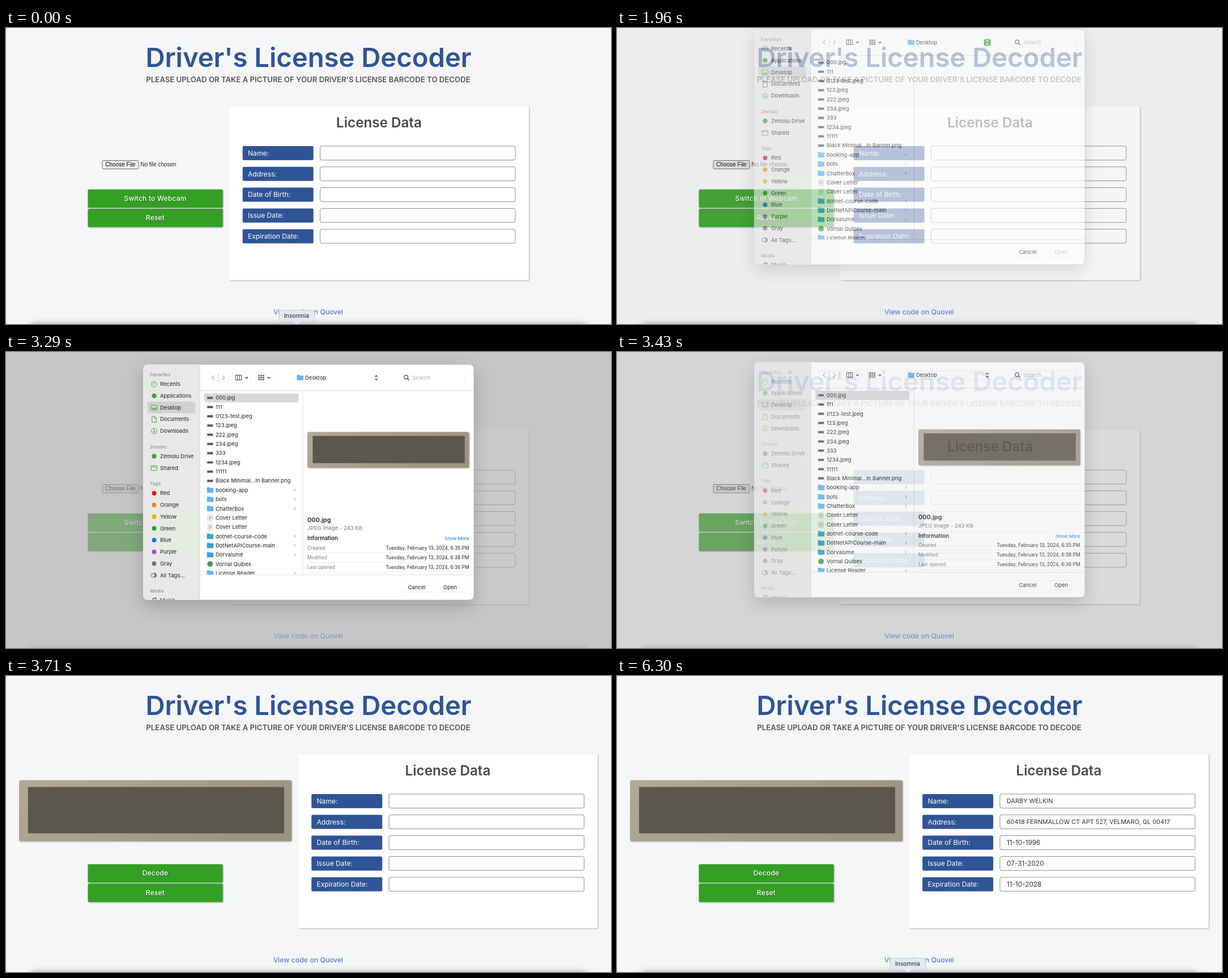
Animation, 1068 px wide and 524 px high, one loop 7140 ms. Source, as an HTML page:

```html
<!DOCTYPE html>
<html lang="en">
<head>
<meta charset="utf-8">
<title>Driver's License Decoder</title>
<style>
  html, body { margin: 0; width: 100%; height: 100%; overflow: hidden; background: #666; }
  #stage { display: block; width: 100vw; height: 100vh; }
  text { font-family: Inter, sans-serif; white-space: pre; }
  .native { font-family: "Liberation Sans", Arial, sans-serif; }
  .card { filter: drop-shadow(1px 1px 1px rgba(0,0,0,.3)); }
  .button { filter: drop-shadow(1px 1px 1.2px rgba(0,0,0,.4)); }
  .caption { letter-spacing: .2px; filter: drop-shadow(1px 1px .8px rgba(0,0,0,.35)); }
  .control { filter: drop-shadow(0 .5px .7px rgba(0,0,0,.3)); }
  .sheet { filter: drop-shadow(0 10px 15px rgba(0,0,0,.2)); }
  .dock { filter: drop-shadow(0 0 6px rgba(0,0,0,.4)); }
</style>
</head>
<body>
<svg id="stage" viewBox="0 0 1068 524"></svg>
<script>
const LOOP = 7140, STEP = 70;
const BLUE = '#2f5496', GREEN = '#33a023', HOVER = '#478e3d', TINT = '#3aa935';

// Markup helpers; text is centred vertically on cy.
const attrs = o => Object.entries(o).map(([k, v]) => `${k}="${v}"`).join(' ');
const rect = (x, y, width, height, rx, fill, more = {}) =>
  `<rect ${attrs({ x, y, width, height, rx, fill, ...more })}/>`;
const text = (x, cy, size, label, fill = '#222', more = {}) =>
  `<text ${attrs({ x, y: cy + size * .36, 'font-size': size, fill, ...more })}>${label}</text>`;
const line = (d, stroke, width = 1, more = {}) =>
  `<path ${attrs({ d, stroke, 'stroke-width': width, fill: 'none', ...more })}/>`;
const dot = (cx, cy, r, fill, more = {}) => `<circle ${attrs({ cx, cy, r, fill, ...more })}/>`;
const group = (id, body, more = {}) => `<g ${attrs({ id, ...more })}>${body}</g>`;
const clip = (x, y, w, h, body) =>
  `<svg x="${x}" y="${y}" width="${w}" height="${h}" viewBox="${x} ${y} ${w} ${h}">${body}</svg>`;
const MIDDLE = { 'text-anchor': 'middle' }, END = { 'text-anchor': 'end' };
const bold = (more = {}) => ({ 'font-weight': 600, ...more });

function button(id, y, label) {
  return group(id, rect(144.5, y, 238, 32.3, 2, GREEN, { class: 'button' }) +
    text(263.5, y + 15.8, 12, label, '#fff', { ...MIDDLE, class: 'caption', 'font-weight': 500 }));
}

function photo(x, y, w, h) {
  return rect(x, y, w, h, 3, 'url(#paper)', { class: 'card' }) +
    rect(x + w * .033, y + h * .11, w * .94, h * .76, 1, '#5c574d');
}

const FIELDS = [
  ['Name:', 'DARBY WELKIN', 10.9],
  ['Address:', '60418 FERNMALLOW CT APT 527, VELMARO, QL 00417', 10.9],
  ['Date of Birth:', '11-10-1996', 11.8],
  ['Issue Date:', '07-31-2020', 11.8],
  ['Expiration Date:', '11-10-2028', 11.8]
];
const rowY = i => 209 + i * 36.8;

function card() {
  const rows = FIELDS.map(([label], i) => {
    const y = rowY(i);
    return rect(417.7, y, 125, 25, 2.5, BLUE) + text(427, y + 12.4, 12.1, label, '#fff') +
      rect(554.5, y, 344.5, 24.8, 3, '#fff', { stroke: '#8c8c8c' });
  }).join('');
  const values = FIELDS.map(([, value, size], i) =>
    text(566.5, rowY(i) + 12.4, size, value, '#333')).join('');
  return group('card', rect(394, 138, 529, 308.5, 3, '#fff', { class: 'card' }) +
    text(658.5, 167.5, 24.2, 'License Data', '#4a4a4a', bold(MIDDLE)) + rows + group('values', values));
}

function page() {
  return rect(0, 0, 1068, 524, 2, '#f4f6f8') +
    text(534, 52, 47.2, "Driver's License Decoder", BLUE, bold(MIDDLE)) +
    text(533.5, 91.7, 13.2, "PLEASE UPLOAD OR TAKE A PICTURE OF YOUR DRIVER'S LICENSE BARCODE TO DECODE",
      '#555', bold(MIDDLE)) +
    group('upload',
      rect(170, 234.5, 64, 15, 2, '#efefef', { id: 'choose', stroke: '#666' }) +
      text(202, 241.7, 10, 'Choose File', '#000', { ...MIDDLE, class: 'native' }) +
      text(237.3, 241.7, 10, 'No file chosen', '#222', { class: 'native' }) +
      button('webcam', 285.7, 'Switch to Webcam') + button('clear', 320, 'Reset')) +
    group('result', photo(23, 184.5, 481, 108) +
      button('decode', 333.2, 'Decode') + button('reset', 367.6, 'Reset')) +
    card() +
    text(533.5, 502.8, 12.3, 'View code on Quovel', '#4b66c9', { ...MIDDLE, id: 'link' }) +
    rect(40, 524.5, 988, 30, 12, '#ddd', { class: 'dock' });
}

const folder = (x, cy, fill = '#62b8ee') =>
  line(`M${x} ${cy - 3.8}h4l1.5 1h6`, '#3c9edb', 1.6) + rect(x, cy - 3.2, 11.5, 8, 1, fill);

// kind: i picture, f folder, t teal folder, d document, a application
const FILES = [
  ...['000.jpg', '111', '0123-test.jpeg', '123.jpeg', '222.jpeg', '234.jpeg', '333', '1234.jpeg',
    '11111', 'Black Minimal...In Banner.png'].map(n => ['i', n]),
  ['f', 'booking-app'], ['f', 'bots'], ['f', 'ChatterBox'], ['d', 'Cover Letter'], ['d', 'Cover Letter'],
  ['t', 'dotnet-course-code'], ['t', 'DotNetAPICourse-main'], ['t', 'Dorvalume'],
  ['a', 'Vornal Quibex'], ['f', 'License Reader']
];

function fileIcon(kind, y) {
  switch (kind) {
    case 'i': return rect(355, y - 2, 10.5, 4.2, .5, '#555', { stroke: '#ccc', 'stroke-width': .8 });
    case 'd': return rect(356, y - 5, 8.5, 10.5, 1, '#f4f4f4', { stroke: '#bbb', 'stroke-width': .7 }) +
      line(`M358 ${y - 1.5}h4.5m-4.5 2h4.5m-4.5 2h3`, '#777', .8);
    case 'a': return dot(360.2, y + .2, 5, '#4a9d57');
    default: return folder(354.7, y, kind === 't' ? '#35a4d3' : '#62b8ee');
  }
}

function fileList() {
  return FILES.map(([kind, name], i) => {
    const y = 81 + i * 16.34;
    return fileIcon(kind, y) + text(370, y, 9.5, name) +
      ('ft'.includes(kind) ? line(`M508.6 ${y - 2.3}l2.4 2.3l-2.4 2.3`, '#888') : '');
  }).join('');
}

const PLACES = [
  [57, 'Recents', 'clock'], [77.5, 'Applications', 'app'], [98.2, 'Desktop', 'screen'],
  [119, 'Documents', 'page'], [140, 'Downloads', 'down'],
  [184.5, 'Zemolu Drive', 'app'], [205.2, 'Shared', 'share']
];
const TAGS = { Red: '#e8120c', Orange: '#ef8412', Yellow: '#efab12', Green: '#2aa01c',
  Blue: '#1273e0', Purple: '#9a55bf', Gray: '#747474' };

function placeIcon(kind, y) {
  const ring = dot(261.5, y, 4.8, 'none', { stroke: TINT });
  switch (kind) {
    case 'clock': return ring + line(`M261.5 ${y - 3}v3h-2.5`, TINT);
    case 'down': return ring + line(`M261.5 ${y - 2.6}v5m-2-2l2 2l2-2`, TINT);
    case 'app': return dot(261.5, y, 4.2, TINT);
    case 'page': return line(`M257.8 ${y - 5}h4.5l3 3v7.5h-7.5zM262 ${y - 5}v3.2h3`, TINT);
    default: return rect(256, y - 4, 10.5, 8.5, 1.2, 'none', { stroke: TINT }) +
      (kind === 'screen' ? line(`M258 ${y + 2}h7`, TINT, 1.8) : line(`M256 ${y - 1.5}h10.5`, TINT));
  }
}

function sidebar() {
  const heading = (y, label) => text(254, y, 8.2, label, '#9a9a9a', bold());
  const item = (y, label) => text(272, y, 9.5, label);
  return rect(249.5, 87.8, 84.5, 20.5, 4, '#d0d0d0') +
    heading(40.2, 'Favorites') + heading(168, 'Zemolu') + heading(233, 'Tags') + heading(423, 'Media') +
    PLACES.map(([y, label, kind]) => placeIcon(kind, y) + item(y, label)).join('') +
    Object.entries(TAGS).map(([label, fill], i) =>
      dot(261.5, 250 + i * 20.75, 3.9, fill) + item(250 + i * 20.75, label)).join('') +
    dot(259.6, 395.2, 3.4, 'none', { stroke: '#666' }) +
    line('M261.5 391.8a3.4 3.4 0 0 1 0 6.8', '#666', 2.2) + item(395.2, 'All Tags...') +
    clip(242, 430, 100, 8.6, line('M259.5 441v-4.5l5-1v5', '#555', 1.4) + item(440, 'Music'));
}

function toolbar() {
  const box = (x, w) => rect(x, 38, w, 15, 3, '#fff', { class: 'control' });
  const down = x => line(`M${x} 44.3l2.3 2.3l2.3-2.3`, '#333', 1.3);
  let grid = '';
  for (let i = 0; i < 9; i++) grid += rect(445.3 + i % 3 * 3.8, 40.6 + (i / 3 | 0) * 3.5, 3, 2.4, .4, '#666');
  return box(357, 35.5) + line('M374.7 38v15', '#ccc') +
    line('M367.5 41.5l-3.7 4l3.7 4M382 41.5l3.7 4l-3.7 4', '#aaa', 1.2) +
    box(398, 34.5) + line('M405.3 41h10.5v8.5h-10.5zM408.8 41v8.5M412.3 41v8.5', '#444') + down(422.3) +
    box(438, 34) + grid + down(461.8) +
    box(507, 154) + folder(513.5, 45.3) + text(528, 45.2, 9.5, 'Desktop') +
    rect(647.7, 39.4, 12, 12, 3, TINT, { id: 'stepperBox' }) +
    line('M651.5 44l2.2-2.3l2.2 2.3m-4.4 3l2.2 2.3l2.2-2.3', '#fff', 1.2, { id: 'stepper' }) +
    box(697, 113.5) + dot(706.2, 44.5, 3.3, 'none', { stroke: '#444', 'stroke-width': 1.2 }) +
    line('M708.7 47l3 3', '#444', 1.3) + text(717.5, 45.4, 9.5, 'Search', '#b0b0b0');
}

function preview() {
  const facts = [['Created', '6:35 PM'], ['Modified', '6:38 PM'], ['Last opened', '6:36 PM']];
  return photo(532, 141.5, 285.5, 63.5) +
    text(532, 297, 11, '000.jpg', '#222', bold()) +
    text(532, 312, 9.5, 'JPEG image - 243 KB', '#777') +
    text(532, 330, 9.7, 'Information', '#222', bold()) +
    text(817.5, 330.2, 8.1, 'Show More', '#1a73e0', END) +
    facts.map(([label, time], i) => {
      const y = 346.7 + i * 17.1;
      return text(532, y, 8.4, label, '#777') +
        text(817.5, y, 8.4, 'Tuesday, February 13, 2024, ' + time, '#222', END) +
        line(`M532 ${y + 8.5}h285.5`, '#e2e2e2', .7);
    }).join('');
}

function dialog() {
  const push = (x, label, id) => rect(x, 409, 54, 15.7, 4, '#fff', { class: 'control' }) +
    text(x + 27, 416.8, 9.5, label, '#222', { ...MIDDLE, id });
  return group('dialog',
    rect(242, 22, 584, 417, 8, '#fff', { class: 'sheet', stroke: '#aaa', 'stroke-width': .6 }) +
    line('M342 22H250a8 8 0 0 0-8 8V431a8 8 0 0 0 8 8H342z', 'none', 0, { style: 'fill:#e8e8e8' }) +
    rect(242, 282, 100, 76, 0, 'url(#glow)') +
    group('places', sidebar()) +
    line('M342.2 22V439', '#d4d4d4', .8) +
    line('M342 68.5H826M342 394.5H826M524 69V394', '#e0e0e0') +
    toolbar() +
    rect(350, 73.3, 166.5, 16, 3, '#d8d8d8', { id: 'selection' }) +
    clip(342, 69, 182, 325, fileList()) +
    group('preview', preview()) +
    push(698, 'Cancel', 'cancel') + push(757, 'Open', 'open'));
}

const tooltip = () => group('tooltip',
  line('M486 499.5H541a4 4 0 0 1 4 4V516a4 4 0 0 1-4 4H521l-7.5 6l-7.5-6H486a4 4 0 0 1-4-4V503.5a4 4 0 0 1 4-4z',
    '#c2c6d0', .8, { style: 'fill:#e5e8f1' }) +
  text(513, 509, 10.3, 'Insomnia', '#222', MIDDLE));

const stage = document.getElementById('stage');
stage.innerHTML = `<defs>
  <linearGradient id="paper" x2="1" y2=".3"><stop stop-color="#b3a999"/><stop offset="1" stop-color="#9d9382"/></linearGradient>
  <linearGradient id="glow"><stop stop-color="#e5eee0" stop-opacity="0"/><stop offset="1" stop-color="#e2eedc"/></linearGradient>
  </defs>` + page() + rect(0, 0, 1068, 524, 2, '#acacac', { id: 'dim' }) + dialog() + tooltip();

const el = {};
stage.querySelectorAll('[id]').forEach(node => el[node.id] = node);

// time, dialog offset, dialog opacity, backdrop opacity
const SHEET = [
  [1890, -30, 0, 0], [1960, -20, .62, .12], [2030, -12, .85, .3], [2100, -6, .96, .46],
  [2170, -2, 1, .58], [2240, 0, 1, .64], [3290, 0, 1, .64], [3360, -1.5, .93, .57],
  [3430, -4.5, .8, .44], [3500, -10, .5, .27], [3570, -17, .2, .12], [3640, -22, 0, 0]
];

function sample(table, t) {
  const next = table.findIndex(row => row[0] > t);
  if (next < 0) return table[table.length - 1];
  if (next === 0) return table[0];
  const a = table[next - 1], b = table[next], k = (t - a[0]) / (b[0] - a[0]);
  return a.map((v, i) => v + (b[i] - v) * k);
}

const within = (t, from, to) => t >= from && t < to;
const show = (node, on) => node.style.display = on ? '' : 'none';
const paint = (node, fill) => node.setAttribute('fill', fill);

function draw(time) {
  const t = Math.floor(time % LOOP / STEP) * STEP;
  const loaded = t >= 3640, selected = t >= 3290;
  const [, dy, alpha, shade] = sample(SHEET, t);

  show(el.dialog, alpha > 0);
  el.dialog.setAttribute('transform', `translate(0 ${dy})`);
  el.dialog.style.opacity = alpha;
  el.dim.style.opacity = shade;
  show(el.selection, selected);
  show(el.preview, selected);
  show(el.stepperBox, !selected);
  el.stepper.setAttribute('stroke', selected ? '#333' : '#fff');
  paint(el.open, selected ? '#222' : '#b8b8b8');
  el.places.style.opacity = t >= 3360 ? .45 : 1;

  show(el.upload, !loaded);
  show(el.result, loaded);
  el.card.setAttribute('transform', `translate(${loaded ? 121.5 : 0} 0)`);
  show(el.values, t >= 5040);

  paint(el.choose, within(t, 1610, 1680) ? '#f5f5f5' : t >= 1540 ? '#e0e0e0' : '#efefef');
  const decode = el.decode.firstChild;
  paint(decode, within(t, 4130, 5810) ? HOVER : GREEN);
  decode.style.filter = within(t, 4900, 5040) ? 'none' : '';
  paint(el.reset.firstChild, within(t, 5810, 5880) ? HOVER : GREEN);
  paint(el.link, within(t, 6090, 6160) ? '#2f4699' : '#4b66c9');

  el.tooltip.style.opacity = t >= 6300 ? 1 : Math.max(0, 1 - t / 420);
}

const start = performance.now();
function frame() {
  draw(performance.now() - start);
  requestAnimationFrame(frame);
}
frame();
</script>
</body>
</html>
```
